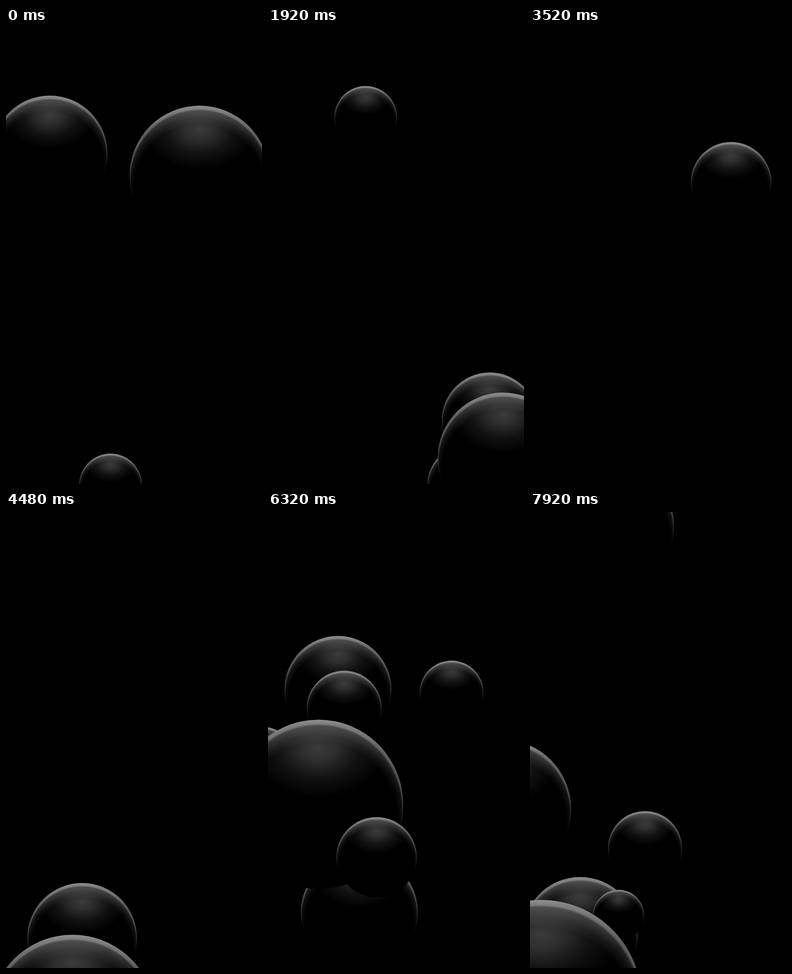
These frames come from a looping animation (561 by 998 pixels, 8000 ms). An HTML page:

```html
<!DOCTYPE html>
<html lang="en">
<head>
<meta charset="utf-8">
<title>Rising spheres</title>
<style>
  html, body { margin: 0; width: 100%; height: 100%; overflow: hidden; background: #000; }
  svg { display: block; width: 100%; height: 100%; }
</style>
</head>
<body>
<svg viewBox="0 0 561 998" preserveAspectRatio="none">
  <defs>
    <!-- Offset centres turn the rings into crescents lit from above. -->
    <radialGradient id="glow" gradientUnits="userSpaceOnUse" cx="0" cy=".2" r="1.2">
      <stop offset=".78" stop-color="#fff" stop-opacity="0"/>
      <stop offset=".85" stop-color="#fff" stop-opacity=".07"/>
      <stop offset=".93" stop-color="#fff" stop-opacity=".2"/>
      <stop offset="1" stop-color="#fff" stop-opacity=".4"/>
    </radialGradient>
    <radialGradient id="rim" gradientUnits="userSpaceOnUse" cx="0" cy=".05" r="1.05">
      <stop offset=".934" stop-color="#fff" stop-opacity="0"/>
      <stop offset=".953" stop-color="#fff" stop-opacity=".22"/>
      <stop offset="1" stop-color="#fff" stop-opacity=".2"/>
    </radialGradient>
    <radialGradient id="spot" gradientUnits="userSpaceOnUse" cx="0" cy="0" r="1"
        gradientTransform="translate(0 -.66) scale(.8 .58)">
      <stop offset="0" stop-color="#fff" stop-opacity=".23"/>
      <stop offset=".25" stop-color="#fff" stop-opacity=".18"/>
      <stop offset=".6" stop-color="#fff" stop-opacity=".07"/>
      <stop offset="1" stop-color="#fff" stop-opacity="0"/>
    </radialGradient>
    <linearGradient id="neckFade" gradientUnits="userSpaceOnUse" x1="0" y1="-1.06" x2="0" y2="-.68">
      <stop offset="0" stop-color="#fff" stop-opacity="0"/>
      <stop offset="1" stop-color="#fff" stop-opacity=".3"/>
    </linearGradient>
    <g id="sphere">
      <circle r="1"/>
      <circle r="1" fill="url(#spot)"/>
      <circle r="1" fill="url(#glow)"/>
      <circle r="1" fill="url(#rim)"/>
    </g>
    <g id="necked">
      <use href="#sphere"/>
      <path d="M.56-1.06Q.57-.93 .74-.68" fill="none" stroke="url(#neckFade)" stroke-width=".025"/>
    </g>
  </defs>
  <rect width="561" height="998"/>
  <g id="stage"></g>
</svg>
<script>
const LOOP = 8000, STEP = 80;
const stage = document.getElementById('stage');
const balls = [];

// Pose at time `at` (ms); velocities in px/s; `accel` is vertical, `grow` changes the radius.
function ball(at, x, y, r, vx, vy, { accel = 0, grow = 0, shape = 'sphere' } = {}) {
  const node = document.createElementNS('http://www.w3.org/2000/svg', 'use');
  node.setAttribute('href', '#' + shape);
  stage.append(node);
  balls.push({ node, at, x, y, r, vx, vy, accel, grow });
}

// Back to front.
ball(0, 96, 274, 126, 0, -420);
ball(0, 424, 323, 153, 0, -400);
ball(0, 229, 1000, 68.5, -7.8, -419);

ball(1920, 437.5, 1000, 88, 2, -414);
ball(1920, 486, 859, 105, 16.7, -930.6);
ball(1920, 515, 941, 143, 19.4, -628, { grow: 4 });

ball(5680, 399.5, 709, 69.7, 4.3, -490.6);
ball(5680, 158, 591, 118, -7.3, -305.4, { accel: -45.5 + 10, grow: -1.6 });
ball(5680, 172, 702, 82, -7.8, -426);
ball(6960, -22, 271, 90, -5, -450);
ball(6960, 214, 794, 67, 0, -850);
ball(6960, 195, 600, 128, -8, -496, { accel: -204, shape: 'necked' });
ball(5680, 123, 845, 184, -19, -285, { accel: -111.2, grow: 2 });
ball(6960, 238, 359, 88, 0, -620);

ball(6960, 258, 1040, 81, -6.2, -317);
ball(7920, -62, 650, 152, 0, -600);
ball(7920, 110, 925, 126, 0, -400);
ball(7920, 194, 883, 56, 0, -400);
ball(7920, 24, 1070, 221, 0, -250);

function render(time) {
  for (const b of balls) {
    const s = (time - b.at) / 1000;
    const x = b.x + b.vx * s;
    const y = b.y + b.vy * s + b.accel * s * s / 2;
    const r = b.r + b.grow * s;
    const visible = s > -2.5 && y + r > 0 && y - r < 998;
    b.node.setAttribute('visibility', visible ? 'visible' : 'hidden');
    if (visible) b.node.setAttribute('transform', `translate(${x} ${y}) scale(${r})`);
  }
}

const start = performance.now();
function tick() {
  const time = (performance.now() - start) % LOOP;
  // The opening pose is held for two steps.
  render(time < 2 * STEP ? 0 : Math.floor(time / STEP) * STEP);
  requestAnimationFrame(tick);
}
tick();
</script>
</body>
</html>
```
